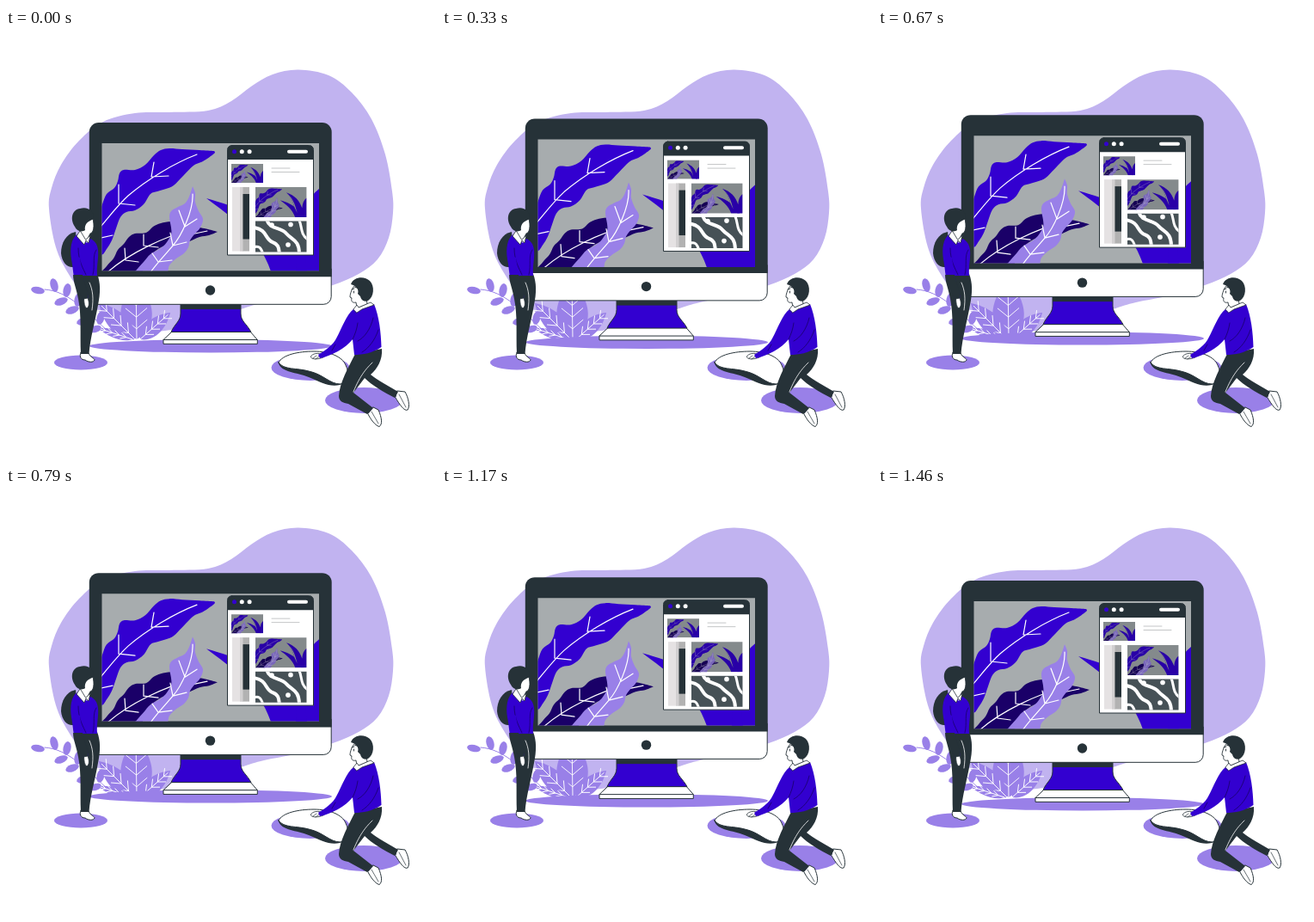
An HTML page with a canvas for the animation above (1.5 s loop, 500x500 px).

```html
<!DOCTYPE html>
<html lang="en">
<head>
<meta charset="utf-8">
<title>Floating monitor</title>
<style>
html, body { margin: 0; width: 100%; height: 100%; overflow: hidden; background: #fff; }
canvas { display: block; width: 100vw; height: 100vh; }
</style>
</head>
<body>
<canvas id="stage" width="500" height="500"></canvas>
<script>
const ctx = document.getElementById('stage').getContext('2d');
const LOOP = 1500, STEPS = 36, LIFT = 10;
const BLUE = '#3300d0', LILAC = '#9980e8', PALE = '#c1b3f0', NIGHT = '#1a0068';
const DARK = '#263238', GRAY = '#a7acae', WHITE = '#fff';

const fill = (path, color) => { ctx.fillStyle = color; ctx.fill(path); };
const stroke = (path, color = DARK, width = 1) => {
  ctx.strokeStyle = color;
  ctx.lineWidth = width;
  ctx.stroke(path);
};
const shape = (d, color) => fill(new Path2D(d), color);
const line = (d, color, width) => stroke(new Path2D(d), color, width);
const outlined = (d, color = WHITE, width = 1) => { shape(d, color); line(d, DARK, width); };
const rect = (x, y, w, h, color) => { ctx.fillStyle = color; ctx.fillRect(x, y, w, h); };

function ellipse(x, y, rx, ry, color, turn = 0) {
  const path = new Path2D();
  path.ellipse(x, y, rx, ry, turn, 0, Math.PI * 2);
  fill(path, color);
}

function box(x, y, w, h, radii) {
  const path = new Path2D();
  path.roundRect(x, y, w, h, radii);
  return path;
}

// Smooth curve through the given points; an open one keeps a sharp tip.
function through(text, closed = false) {
  const p = text.split(' ').map(pair => pair.split(',').map(Number));
  const n = p.length;
  const at = i => closed ? p[(i + n) % n] : p[Math.max(0, Math.min(n - 1, i))];
  const path = new Path2D();
  path.moveTo(...p[0]);
  for (let i = 0; i < (closed ? n : n - 1); i++) {
    const [a, b, c, d] = [at(i - 1), at(i), at(i + 1), at(i + 2)];
    path.bezierCurveTo(b[0] + (c[0] - a[0]) / 6, b[1] + (c[1] - a[1]) / 6,
      c[0] - (d[0] - b[0]) / 6, c[1] - (d[1] - b[1]) / 6, c[0], c[1]);
  }
  path.closePath();
  return path;
}

const backdrop = through('50,210 53,186 64,159 85,131 113,109 150,99 190,98 235,96 262,85 285,68 ' +
  '310,54 340,48.5 375,55 402,75 425,106 441,147 449,190 450,215 445,244 432,269 410,286 380,299 ' +
  '340,311 300,319 273,327 230,342 185,352 150,351 120,339 97,318 74,288 58,255', true);
const blueLeaf = through('242,143 225,142 205,141 190,140 180,142 172,148 162,159 150,165 137,165 ' +
  '132,169 130,178 126,186 117,193 112,205 108,218 100,262 111,264 117,257 123,247 128,233 133,220 ' +
  '140,214 150,212 160,205 168,193 176,190 186,187 195,183 205,173 218,160 229,155 242,146 242,143');
const darkLeaf = through('246,237 235,234 222,231 208,226 192,225 180,227 171,231 163,238 150,239 ' +
  '143,243 137,251 130,258 125,268 117,277 110,290 152,290 163,271 174,259 190,251 210,249 225,243 ' +
  '236,241 246,237');
const lilacLeaf = through('217,184 220,192 220,202 224,213 229,222 226,232 219,240 214,247 212,255 ' +
  '207,262 198,268 190,276 183,290 146,290 152,281 160,272 168,263 180,256 187,249 192,240 192,232 ' +
  '190,220 192,213 200,208 208,204 213,196 217,184');

function scene() {
  rect(111, 133, 254, 150, GRAY);
  shape('M233 198C250 203 280 211 303 230C298 205 286 180 264 160C306 174 330 200 342 238C343 215 350 198 364 187V283H308C294 241 261 219 233 198Z', BLUE);
  shape('M264 160C296 188 307 215 318 262L303 230C298 205 286 180 264 160Z', GRAY);
  shape('M342 238C349 253 348 267 350 283H337C338 264 337 248 330 224Z', BLUE);
  fill(blueLeaf, BLUE);
  line('M222 147C196 157 164 176 142 195C130 206 121 218 110 231M172 156L169 173L189 172M131 182V204L150 206M110 244L124 241', WHITE, 1.2);
  fill(darkLeaf, NIGHT);
  line('M215 235C185 242 143 262 118 284M160 240V253L177 255M138 256L139 270L154 272M234 236L215 240', WHITE, 1.2);
  fill(lilacLeaf, LILAC);
  line('M217 193C218 212 204 242 194 253C183 266 175 274 168 284M201 212L208 231L222 222M191 238L194 253L210 249M170 262L177 272L193 270', WHITE, 1.2);
}

function miniScene(x, y, w, h) {
  ctx.save();
  ctx.clip(box(x, y, w, h, 0));
  ctx.translate(x, y);
  ctx.scale(w / 252.5, h / 148);
  ctx.translate(-111.5, -134);
  scene();
  ctx.fillStyle = 'rgba(38,50,56,.25)';
  ctx.globalCompositeOperation = 'multiply';
  ctx.fillRect(111, 134, 254, 149);
  ctx.restore();
}

function patternTile() {
  ctx.save();
  ctx.clip(box(290, 224.5, 59.5, 36, 0));
  rect(290, 224, 60, 37, '#465156');
  line('M288 232C304 234 301 246 310 249C318 252 317 257 318 263', WHITE, 4);
  line('M303 222C306 235 320 231 326 239C333 247 341 246 341 263', WHITE, 4);
  line('M340 222C345 229 341 239 351 246M288 255C295 252 297 257 299 263', WHITE, 3);
  for (const [x, y] of [[309, 229], [331, 228.5], [328, 252]]) ellipse(x, y, 2.8, 2.8, WHITE);
  ctx.restore();
}

function browser() {
  const frame = box(257.5, 136.5, 100, 127.5, [5, 5, 0, 0]);
  fill(frame, WHITE);
  fill(box(257.5, 136.5, 100, 16.5, [5, 5, 0, 0]), DARK);
  stroke(frame);
  [BLUE, WHITE, WHITE].forEach((color, i) => ellipse(265.5 + i * 8.8, 143.7, 2.5, 2.5, color));
  fill(box(327, 141.7, 24, 4, 2), WHITE);
  miniScene(262, 158, 37, 22);
  line('M309 163H330M309 167.5H341', '#c4c6c7', 1);
  rect(263, 185, 13, 74.5, '#e5e2e3');
  rect(272, 185, 4, 74.5, '#d2d0d1');
  rect(275.5, 185, 7.5, 74.5, '#b2b2b2');
  rect(275.5, 193, 7.5, 52.5, DARK);
  miniScene(290, 185, 59.5, 35);
  patternTile();
}

function monitor() {
  ellipse(238, 369.8, 141, 7.6, LILAC);
  outlined('M193 353L183 362.5V367.3H292.3V362.5L284 353Z');
  line('M183 362.5H292');
  outlined('M203 318V332C203 341 196 344 192 353.5H285C280 344 273 341 273 332V318Z', BLUE);
  rect(203, 320, 70, 7, DARK);
  const chin = box(97.3, 280, 280.9, 41.3, [0, 0, 9, 9]);
  fill(chin, WHITE);
  stroke(chin);
  fill(box(96.8, 110, 281.9, 179.3, [11, 11, 0, 0]), DARK);
  ellipse(237.5, 305, 5.7, 5.7, DARK);
  ctx.save();
  ctx.clip(box(111.5, 134, 252.5, 148.3, 0));
  scene();
  ctx.restore();
  browser();
}

function veinedLeaf(x, y, tipX, tipY, half) {
  const len = Math.hypot(tipX - x, tipY - y);
  ctx.save();
  ctx.translate(x, y);
  ctx.rotate(Math.atan2(tipY - y, tipX - x));
  shape(`M0 0C${len * .2} ${-half * 1.4} ${len * .65} ${-half * 1.3} ${len} 0C${len * .65} ${half * 1.3} ${len * .2} ${half * 1.4} 0 0Z`, LILAC);
  let veins = `M0 0H${len * .92}`;
  for (let f = .18; f < .8; f += .2) {
    const reach = half * .68, far = (f + .15) * len;
    veins += `M${far} ${-reach}L${f * len} 0L${far} ${reach}`;
  }
  line(veins, WHITE, .9);
  ctx.restore();
}

function plants() {
  line('M45 304C73 306 93 329 122 356', LILAC, 1);
  const leaves = [[37, 305, 8, 4, .2], [56, 299, 4.5, 8, -.25], [71, 305, 4.5, 8, .2], [64, 318, 8, 4.2, -.35],
    [84, 316, 4.5, 8, .2], [77, 328, 8, 4.2, -.35], [98, 327, 4.5, 8, .2], [90, 341, 8, 4.2, -.3],
    [110, 337, 4.5, 8, .25], [104, 350, 7, 4, -.3]];
  for (const [x, y, rx, ry, turn] of leaves) ellipse(x, y, rx, ry, LILAC, turn);
  veinedLeaf(152, 362, 151, 294, 18);
  veinedLeaf(150, 362, 108, 320, 11);
  veinedLeaf(147, 362, 107, 349, 5);
  veinedLeaf(156, 362, 191, 331, 9);
}

function woman() {
  ellipse(87, 389, 31, 8.5, LILAC);
  shape('M81 237C70 239 64 250 64 262C65 273 72 279 78 278L83 258Z', DARK);
  outlined('M87 377C85 382 87 386 92 386C96 389 102 389 103 386C103 384 98 383 96 378Z');
  shape('M78 287L106 286C110 296 110 308 107 322C104 340 98 360 96.5 379H87C86 355 88 335 84 315C82 303 78 295 78 287Z', DARK);
  line('M97 296C101 305 102 314 100 328', WHITE, .8);
  outlined('M87 228L86 240L93 248L98 239C102 238 103 230 101 222L90 219Z', WHITE, .9);
  shape('M102 222C103 212 94 207 86 210C77 211 74 222 80 231C82 236 88 238 92 235C91 231 93 226 98 224Z', DARK);
  shape('M83 240C76 244 74 256 76 269C78 279 78 286 79 288H106C105 276 108 268 107 258C106 251 103 247 98 245L94 250Z', BLUE);
  outlined('M86 236L82 242L91 252L93 247L96 250L98 241L93 246Z', WHITE, .8);
  line('M84 256C84 271 90 280 93 287M105 258C100 265 104 275 101 287', NIGHT, .8);
  shape('M76 263C78 280 84 301 90 315L96 313C91 301 88 284 86 267Z', BLUE);
  shape('M79 287H89L96 313L90 316C85 307 81 297 79 287Z', DARK);
  outlined('M90.5 315L95 314C97 319 97 324 94 326C91 324 91 320 90.5 315Z', WHITE, .8);
}

function cushion() {
  ellipse(354, 395, 45.5, 15, LILAC);
  shape('M316.5 389C320 401 338 400 352 406C366 412 377 418 388 415C397 412 399 407 398 402L340 388Z', DARK);
  outlined('M317 389C321 380 340 376 358 376C376 376 391 382 395 392C400 402 398 412 389 414C376 414 370 403 352 399C338 395 323 398 317 389Z');
}

function man() {
  ellipse(416, 433, 45, 15, LILAC);
  cushion();
  outlined('M455 422L464 423C468 430 470 440 467 444C463 446 458 438 453 430Z');
  outlined('M427 441L433 444C437 453 438 461 434 463.5C429 462 424 455 421 449Z');
  line('M457 426L465 441M425 446L433 460', DARK, .7);
  shape('M406 379C398 395 388 412 387 428C387 434 392 436 398 437L420 449L427 442L404 424L417 407C425 415 440 424 452 430L456 423C445 416 432 410 424 403C432 396 438 386 437 373Z', DARK);
  line('M426 389C420 395 412 403 404 423', WHITE, .8);
  outlined('M404 301C401 306 400 310 400 313L402 314C401 318 403 320 407 319L408 326L420 321L418 306Z', WHITE, .9);
  line('M404.5 306V308M402 304L405 303', DARK, .9);
  shape('M401 298C404 289 417 288 423 294C429 300 428 313 421 317C416 319 413 316 412 312L409 309C411 304 407 300 401 298Z', DARK);
  outlined('M367 379C360 377 354 380 354.5 383C357 386 364 385 369 383Z', WHITE, .8);
  line('M357 384L361 381M360 385L364 382', DARK, .7);
  shape('M404 327L428 321C434 336 436 354 436.5 371C426 378 415 380 405 380L403 362C394 373 379 381 365 384L363 380C371 375 381 368 384 361C390 350 396 333 404 327Z', BLUE);
  outlined('M404 327L408 322L410 325L424 319L428 322L414 327L408 331Z', WHITE, .8);
  line('M403 362C406 356 408 350 409 343M414 377C422 372 429 363 433 351M427 337C424 350 417 360 409 364M383 368L379 375', NIGHT, .8);
}

function draw(time) {
  const step = Math.floor((time % LOOP + 5) * STEPS / LOOP) % STEPS;
  const phase = (step + .5) / STEPS;
  const lift = LIFT * (1 - Math.abs(1 - 2 * phase));
  ctx.clearRect(0, 0, 500, 500);
  fill(backdrop, PALE);
  plants();
  ctx.save();
  ctx.translate(0, .3 - lift);
  monitor();
  ctx.restore();
  woman();
  man();
}

ctx.lineJoin = ctx.lineCap = 'round';
const start = performance.now();
function tick() {
  draw(performance.now() - start);
  requestAnimationFrame(tick);
}
tick();
</script>
</body>
</html>
```
